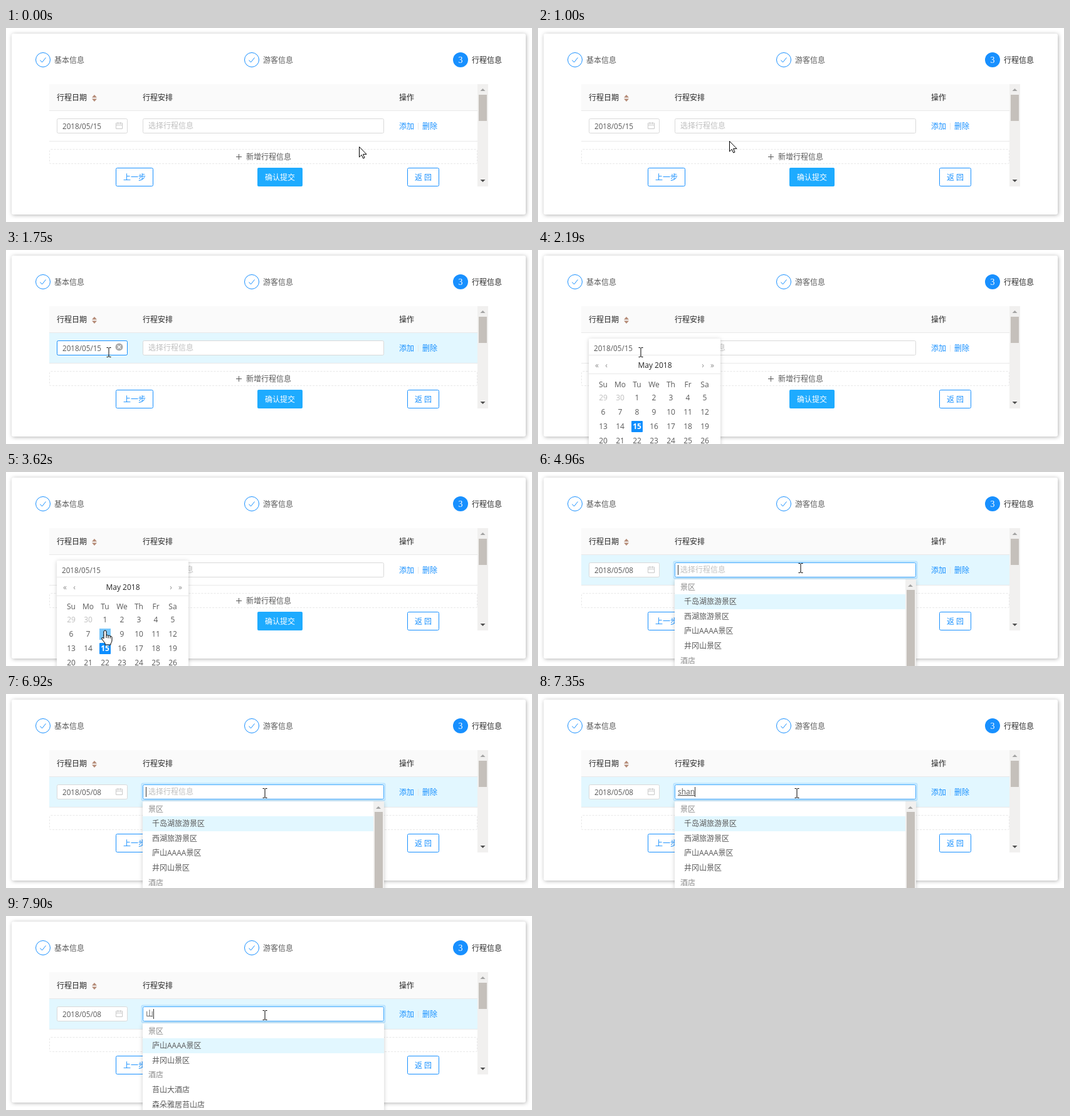
Recreate the animation shown at these times as an HTML page. Size 839 px wide and 311 px high, loop 8000 ms.

```html
<!DOCTYPE html>
<html lang="zh-CN">
<head>
<meta charset="utf-8">
<style>
html, body { margin: 0; width: 100%; height: 100%; overflow: hidden; background: #fff; }
svg { display: block; width: 839px; height: 311px; }
text { font: 12px "Open Sans", "Noto Sans CJK SC", sans-serif; fill: #595959; white-space: pre; }
.dark { fill: #262626; }
.grey { fill: #8c8c8c; }
.pale { fill: #bfbfbf; }
.link { fill: #1890ff; }
.white { fill: #fff; }
.mid { text-anchor: middle; }
.bold { font-weight: 700; }
.date { font-size: 11.7px; }
.box { fill: #fff; stroke: #d9d9d9; }
.blue { fill: #fff; stroke: #1890ff; }
.line { fill: none; stroke: #e8e8e8; }
.panel { fill: #fff; filter: drop-shadow(0 1px 3px rgba(0,0,0,.2)); }
.card { fill: #fff; filter: drop-shadow(1px 1px 3px rgba(0,0,0,.3)); }
</style>
</head>
<body>
<svg id="stage" viewBox="0 0 839 311"></svg>
<script>
const text = (x, y, s, cls = '', id = '') => `<text x="${x}" y="${y}" class="${cls}" id="${id}">${s}</text>`;
const rect = (x, y, w, h, fill, more = '') => `<rect x="${x}" y="${y}" width="${w}" height="${h}" fill="${fill}" ${more}/>`;
const box = (x, y, w, h, cls, more = '') => `<rect x="${x + .5}" y="${y + .5}" width="${w - 1}" height="${h - 1}" rx="2" class="${cls}" ${more}/>`;
const path = (d, more = '') => `<path d="${d}" ${more}/>`;
const group = (id, ...parts) => `<g id="${id}">${parts.join('')}</g>`;

const doneStep = (x, s) =>
  `<circle cx="${x}" cy="51" r="11.5" class="blue"/>` +
  path(`M${x - 4.5} 51.5l3 3.5 6-7.5`, 'fill="none" stroke="#1890ff"') + text(x + 18, 56, s);

const page = [
  rect(9, 9, 820, 290, '', 'rx="3" class="card"'),
  doneStep(59, '基本信息'), doneStep(392, '游客信息'),
  '<circle cx="725" cy="51" r="12" class="link"/>',
  '<text x="725" y="56" class="white mid" style="font:14px \'Liberation Serif\',serif">3</text>',
  text(743, 56, '行程信息', 'dark'),
  rect(69, 90, 683, 42, '#fafafa'),
  rect(69, 133, 683, 48, '#e2f7ff', 'id="row"'),
  path('M69 132.5H752M69 181.5H752M657.5 152V163', 'class="line"'),
  text(81, 116, '行程日期', 'dark'), text(218, 116, '行程安排', 'dark'), text(627, 116, '操作', 'dark'),
  path('M137 111.5l4-4.5 4 4.5zM137 113.5h8l-4 4.5z', 'fill="#b48a76"'),
  text(627, 162, '添加', 'link'), text(664, 162, '删除', 'link'),
  box(81, 145, 113, 24, 'box'),
  text(90, 162, '', 'date', 'date'),
  path('M175.5 152.5h10v9h-10zM175.5 155.5h10M178.5 151v3M182.5 151v3', 'id="icon" fill="none" stroke="#c8c8c8"'),
  group('dateHover', box(81, 145, 113, 24, '', 'fill="none" stroke="#1890ff"'),
    '<circle cx="180.5" cy="155.5" r="6" fill="#acacac"/>',
    path('M178 153l5 5m0-5l-5 5', 'stroke="#fff" stroke-width="1.4"')),
  box(216, 143, 389, 28, '', 'id="glow" fill="none" stroke="#1890ff" stroke-width="2" stroke-opacity=".2"'),
  box(218, 145, 385, 24, 'box', 'id="select"'),
  text(227, 161, '选择行程信息', 'pale', 'hint'),
  text(223, 161, '', '', 'typed'),
  rect(223, 149, 1, 16, '#333', 'id="caret"'),
  box(69, 194, 683, 24, 'line', 'stroke-dasharray="3 2"'),
  path('M367 206.5h9M371.5 202v9', 'stroke="#595959"'), text(383, 211, '新增行程信息'),
  box(175, 224, 60, 30, 'blue'), text(187, 244, '上一步', 'link'),
  rect(401, 224, 72, 30, '#1eabff', 'rx="2"'), text(413, 244, '确认提交', 'white'),
  box(640, 224, 51, 30, 'blue'), text(652, 244, '返 回', 'link'),
  rect(752, 90, 17, 164, '#f1f0ef'), rect(754, 107, 13, 42, '#c5c0bb'),
  path('M756.5 101l4-4 4 4z', 'fill="#a3a3a3"'), path('M756.5 243l4 4 4-4z', 'fill="#505050"')
].join('');

// calendar popup: the first cell is 29 April
const days = Array.from({ length: 28 }, (_, i) => {
  const n = i < 2 ? 29 + i : i - 1;
  const cls = i < 2 ? 'pale' : n === 15 ? 'white bold' : '';
  return text(104 + i % 7 * 27, 241 + Math.floor(i / 7) * 23, n, 'mid ' + cls);
});
const calendar = group('calendar',
  rect(81, 142, 210, 240, '', 'class="panel" rx="2"'),
  text(89, 162, '2018/05/15', 'date'),
  path('M81 168.5H291M81 198.5H291', 'class="line"'),
  ['«', '‹', '›', '»'].map((s, i) => text([94, 109, 263, 278][i], 189, s, 'mid grey')).join(''),
  text(186.5, 189, 'May 2018', 'mid dark'),
  ['Su', 'Mo', 'Tu', 'We', 'Th', 'Fr', 'Sa'].map((s, i) => text(104 + i * 27, 220, s, 'mid')).join(''),
  rect(149, 251, 18, 18, '', 'id="cell"'), rect(149, 274, 18, 18, '#0d8eff', 'rx="1"'), ...days);

const list = (id, width, rows) => group(id,
  rect(218, 172, 385, 200, '', 'class="panel" rx="2"'),
  rect(218, 196, width, 24, '#e2f7ff'),
  rows.map((s, i) => {
    const title = s.length === 2;
    return text(title ? 227 : 233, 188.5 + i * 23.6, s, title ? 'grey' : '');
  }).join(''));
const menu = group('menu',
  list('all', 368, ['景区', '千岛湖旅游景区', '西湖旅游景区', '庐山AAAA景区', '井冈山景区', '酒店']),
  group('bar', rect(586, 172, 17, 140, '#f1f0ef'), rect(588, 189, 13, 130, '#c5c0bb'),
    path('M590 184l4-4 4 4z', 'fill="#a3a3a3"')),
  list('found', 385, ['景区', '庐山AAAA景区', '井冈山景区', '酒店', '苔山大酒店', '森朵雅居苔山店']));

const cursor = group('cursor',
  path('M.5.5V17L4.2 13.4 6.7 19 9 18 6.6 12.4H12Z', 'id="arrow" fill="#fff" stroke="#000"'),
  path('M-3.5-7.5H-1L0-6.5 1-7.5H3.5M0-6.5V7M-3.5 7.5H-1L0 6.5 1 7.5H3.5', 'id="beam" fill="none" stroke="#000"'),
  path('M-2 2Q-2 0 0 0T2 2V8Q4 6.5 5 8.5 7 7 8.2 9.2 10.5 8.5 11 11V16Q11 19 9 21V23H0V20.5L-5 14Q-6 11-3.5 11.5L-2 13ZM2 8v4M5 8.5v4M8.2 9.2v3.5',
    'id="hand" fill="#fff" stroke="#000"'));

const $ = id => document.getElementById(id);
$('stage').innerHTML = page + calendar + menu + cursor;

const track = [[100, 563, 190], [880, 327, 188], [1000, 300, 180], [1750, 164, 164], [2200, 164, 164],
  [2650, 139, 241], [2970, 149, 259], [3080, 149, 259], [3180, 158, 254], [3680, 158, 254],
  [4190, 445, 158], [4290, 445, 158], [4750, 419, 154], [5270, 419, 154], [5590, 413, 159]];

const ramp = (t, start, span) => Math.max(0, Math.min(1, (t - start) / span));
const pulse = (t, on, off, span) => ramp(t, on, span) - ramp(t, off, span);
const show = (id, v) => { $(id).style.opacity = +v; };

function pointer(t) {
  const i = track.findIndex(k => k[0] > t);
  if (i < 1) return track.at(i).slice(1);
  const [a, x0, y0] = track[i - 1], [b, x1, y1] = track[i], p = (t - a) / (b - a);
  return [Math.round(x0 + (x1 - x0) * p), Math.round(y0 + (y1 - y0) * p)];
}

// popups unfold downwards from their top edge
function unfold(id, top, p) {
  show(id, p);
  $(id).setAttribute('transform', `translate(0 ${top}) scale(1 ${.8 + .2 * p}) translate(0 ${-top})`);
}

function draw(t) {
  const step = t < 100 ? 0 : 100 + Math.floor((t - 100) / 110) * 110;
  const [x, y] = pointer(step);
  $('cursor').setAttribute('transform', `translate(${x} ${y})`);
  const shape = t > 4050 || (t > 1590 && t < 2300) ? 'beam' : t > 2350 && t < 3840 ? 'hand' : 'arrow';
  for (const id of ['arrow', 'beam', 'hand']) show(id, id === shape);

  show('row', pulse(t, 1000, 1850, 250) + ramp(t, 4050, 250));
  const hover = pulse(t, 1590, 2000, 150);
  show('dateHover', hover);
  show('icon', 1 - hover);
  $('date').textContent = t < 3730 ? '2018/05/15' : '2018/05/08';
  unfold('calendar', 142, pulse(t, 1850, 3730, 200));
  $('cell').setAttribute('fill', t < 3130 ? 'none' : t < 3400 ? '#e2f7ff' : '#78c6fa');

  const focus = ramp(t, 4290, 200);
  show('glow', focus);
  $('select').style.stroke = t > 4100 ? '#40a9ff' : '';
  unfold('menu', 172, focus);
  const found = t >= 7780;
  show('all', !found);
  show('bar', !found);
  show('found', found);

  // pinyin letters first, then the chosen character
  const letters = t < 7030 ? 0 : Math.min(4, 1 + Math.floor((t - 7030) / 106));
  const typed = found ? '山' : 'shan'.slice(0, letters);
  $('typed').textContent = typed;
  $('typed').style.textDecoration = found ? 'none' : 'underline';
  show('hint', !typed);
  $('caret').setAttribute('x', 223 + (typed ? Math.round($('typed').getComputedTextLength()) : 0));
  show('caret', t > 4330 && (typed || t > 6910 || Math.floor((t - 4330) / 530) % 2 === 1));
}

function loop() {
  draw(performance.now() % 8000);
  requestAnimationFrame(loop);
}
loop();
</script>
</body>
</html>
```
